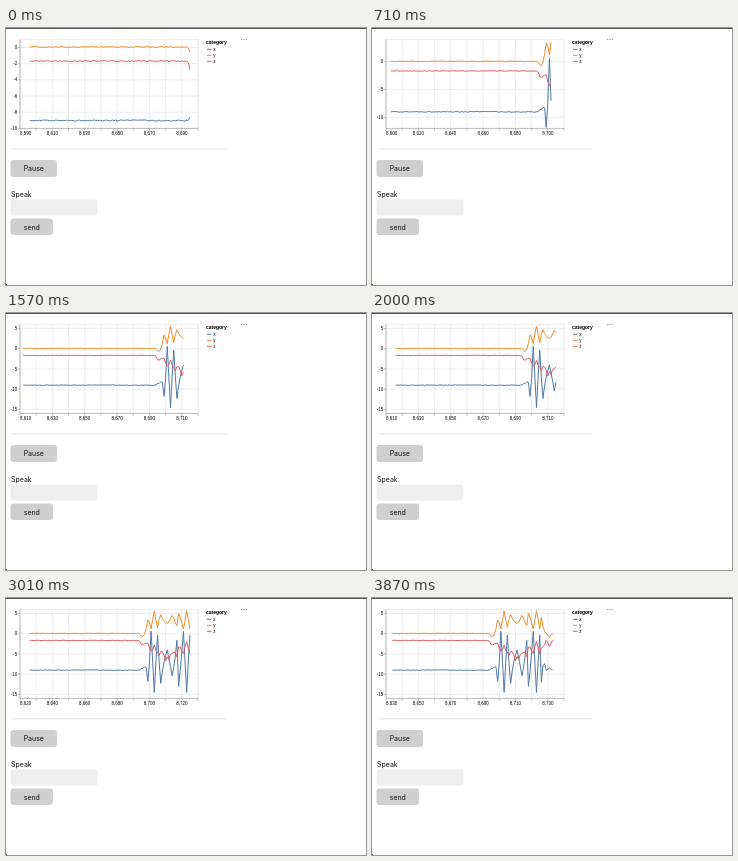
An HTML page that plays this animation: 360x257 px, repeating every 3.95 s.

```html
<!DOCTYPE html>
<html lang="en">
<head>
<meta charset="utf-8">
<title>Live sensor chart</title>
<style>
  html, body { margin: 0; width: 100%; height: 100%; overflow: hidden; background: #fff; }
  svg { display: block; width: 100%; height: 100%; }
  .ui { font: 7px Inter, Arial, sans-serif; fill: #111; }
  .chart { font: 4.5px "Liberation Sans", Arial, sans-serif; fill: #000; }
  .title { font-size: 5px; font-weight: bold; }
  .grid { stroke: #ddd; stroke-width: .5; fill: none; }
  .axis { stroke: #888; stroke-width: .5; fill: none; }
  .series { fill: none; stroke-width: 1; }
</style>
</head>
<body>
<svg viewBox="0 0 360 257">
  <rect width="360" height="1" fill="#555"/>
  <rect y="256" width="1" height="1" fill="#555"/>
  <g id="chart" class="chart"></g>
  <text class="chart title" x="200" y="15.7">category</text>
  <g id="legend" class="chart"></g>
  <path d="M235 11.5h6" stroke="#999" stroke-dasharray="1.2"/>
  <rect x="6.5" y="120" width="214" height="1.5" fill="#ebebeb"/>
  <g class="ui">
    <rect x="4.5" y="132" width="46.5" height="17" rx="3" fill="#cfcfcf"/>
    <text x="27.8" y="143" text-anchor="middle">Pause</text>
    <text x="5" y="169">Speak</text>
    <rect x="4.5" y="171.5" width="87" height="16" rx="2.5" fill="#eee"/>
    <rect x="4.5" y="190.5" width="42.5" height="16.5" rx="3" fill="#cfcfcf"/>
    <text x="25.8" y="201.5" text-anchor="middle">send</text>
  </g>
</svg>
<script>
const LOOP = 3950, SAMPLE_MS = 102, WINDOW = 100;
const START = 8695;
const plot = { left: 14, right: 192, top: 11.4, bottom: 100.4 };

// Each axis answers the same shaking: kick at its edges, then lift, drift and swing.
const series = [
  { name: 'x', color: '#5179a5', rest: -9.02, kick: .6, lift: 2, drift: 0, swing: 1, jitter: 0 },
  { name: 'y', color: '#f18c25', rest: .06, kick: -1, lift: 3.25, drift: 0, swing: -.3, jitter: .4 },
  { name: 'z', color: '#e05a5c', rest: -1.68, kick: -1.5, lift: -5.6, drift: .45, swing: -.15, jitter: 1.5 }
];

// Sample offsets from START at which the shaking turns, alternately up and down.
const turns = [2, 4, 6, 8, 10, 12, 16, 19, 22, 23, 26, 28, 30, 31, 33, 36];

const clamp = v => Math.max(0, Math.min(1, v));
const noise = seed => {
  const s = Math.sin(seed * 12.9898) * 43758.5453;
  return s - Math.floor(s) - .5;
};

function zigzag(k) {
  const i = turns.findIndex(turn => turn > k);
  if (i < 1) return 0;
  const part = (k - turns[i - 1]) / (turns[i] - turns[i - 1]);
  return (i % 2 ? 1 : -1) * (1 - 2 * part);
}
const bump = (k, center) => clamp(1 - Math.abs(k - center) / 1.8);
const shaking = k => Math.min(clamp((k - 1.6) / 4), clamp((34 - k) / 4));
const strength = k => 5.3 + 2.4 * Math.cos((k - 7) * Math.PI / 10);

function valueAt(s, n) {
  const k = n - START, active = shaking(k), force = strength(k);
  return s.rest
    + s.kick * (bump(k, .6) + bump(k, 36))
    + active * (s.lift + force * (s.drift + s.swing * zigzag(k)))
    + (.14 + s.jitter * active) * noise(k + 200 + s.rest * 31);
}

function tickStep(span, count) {
  const raw = span / count, power = 10 ** Math.floor(Math.log10(raw)), ratio = raw / power;
  return power * (ratio >= Math.sqrt(50) ? 10 : ratio >= Math.sqrt(10) ? 5 : ratio >= Math.SQRT2 ? 2 : 1);
}
function niceDomain(lo, hi) {
  const step = tickStep(hi - lo, 10);
  return [Math.floor(lo / step) * step, Math.ceil(hi / step) * step];
}
function ticks([lo, hi], count) {
  const step = tickStep(hi - lo, count), out = [];
  for (let v = Math.ceil(lo / step) * step; v <= hi; v += step) out.push(v);
  return out;
}
const scale = ([lo, hi], from, to) => v => from + (v - lo) / (hi - lo) * (to - from);
const label = (x, y, anchor, text) => `<text x="${x}" y="${y}" text-anchor="${anchor}">${text}</text>`;

function chartMarkup(last) {
  const { left, right, top, bottom } = plot;
  const indices = Array.from({ length: WINDOW }, (_, i) => last - WINDOW + 1 + i);
  const lines = series.map(s => indices.map(n => valueAt(s, n)));
  const all = lines.flat();
  const xDomain = niceDomain(indices[0], last);
  const yDomain = niceDomain(Math.min(...all), Math.max(...all));
  const x = scale(xDomain, left, right), y = scale(yDomain, bottom, top);
  const xTicks = ticks(xDomain, 10), yTicks = ticks(yDomain, 5);

  let grid = `M${left} ${top}H${right}V${bottom}H${left}Z`;
  let axis = `M${left} ${top}V${bottom}H${right}`;
  let labels = '';

  // Crowded x labels drop every other one; the end labels stay inside the plot.
  const every = xTicks.length > 11 ? 2 : 1;
  xTicks.forEach((v, i) => {
    grid += `M${x(v)} ${top}V${bottom}`;
    axis += `M${x(v)} ${bottom}v2.4`;
    const anchor = i === 0 ? 'start' : i === xTicks.length - 1 ? 'end' : 'middle';
    if (i % every === 0) labels += label(x(v), 107.2, anchor, v.toLocaleString('en-US'));
  });
  yTicks.forEach(v => {
    grid += `M${left} ${y(v)}H${right}`;
    axis += `M${left} ${y(v)}h-2.4`;
    labels += label(11.2, y(v) + 1.6, 'end', v);
  });

  const paths = lines.map((values, i) => {
    const points = values.map((v, k) => `${x(indices[k]).toFixed(2)},${y(v).toFixed(2)}`).join(' ');
    return `<polyline class="series" stroke="${series[i].color}" points="${points}"/>`;
  }).join('');
  return `<path class="grid" d="${grid}"/><path class="axis" d="${axis}"/>${paths}${labels}`;
}

document.getElementById('legend').innerHTML = series.map((s, i) => {
  const y = 21.3 + i * 6;
  return `<path d="M201 ${y}h4.5" stroke="${s.color}"/>` + label(207.3, y + 1.5, 'start', s.name);
}).join('');

const chart = document.getElementById('chart');
let shown;
function frame() {
  const t = performance.now() % LOOP;
  const last = Math.floor(START + .9 + t / SAMPLE_MS);
  if (last !== shown) chart.innerHTML = chartMarkup(shown = last);
  requestAnimationFrame(frame);
}
frame();
</script>
</body>
</html>
```
